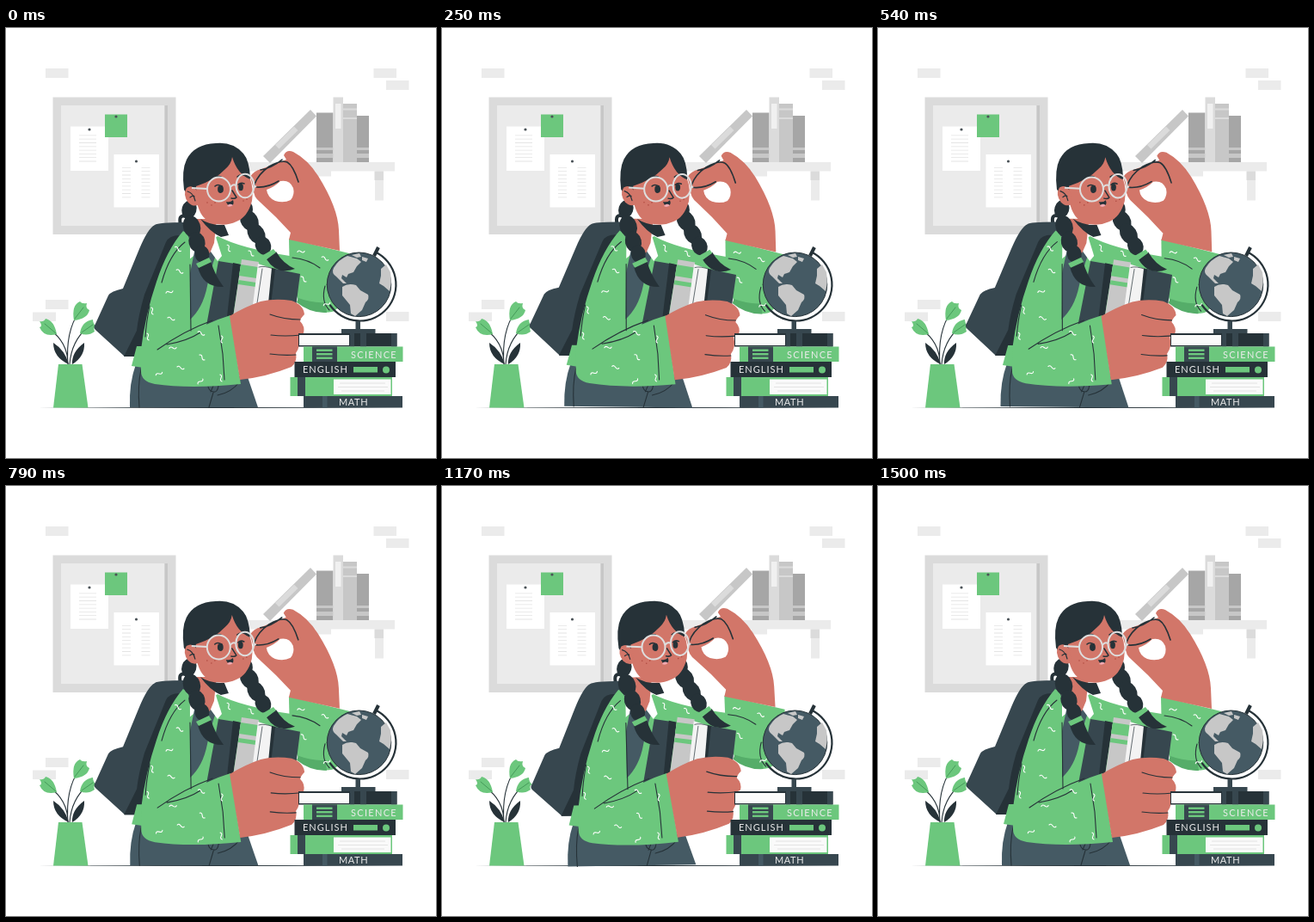
These frames come from a looping animation (500x500 px, 1.54 s). An HTML page:

```html
<!DOCTYPE html>
<html lang="en">
<head>
<meta charset="utf-8">
<title>Student</title>
<style>
  html, body { margin: 0; width: 100%; height: 100%; overflow: hidden; background: #fff; }
  svg { display: block; width: 100%; height: 100%; }
  .green { fill: #6cc77d; }
  .moss { fill: #55ad69; }
  .ink { fill: #263238; }
  .slate { fill: #37474f; }
  .denim { fill: #455a64; }
  .skin { fill: #d27669; }
  .white { fill: #fff; }
  .g1 { fill: #ebebeb; }
  .g2 { fill: #dbdbdb; }
  .g3 { fill: #c7c7c7; }
  .g4 { fill: #a6a6a6; }
  .line { fill: none; stroke: #263238; stroke-width: 1.1; stroke-linecap: round; stroke-linejoin: round; }
  .rule { fill: none; stroke: #e4e4e4; stroke-dasharray: .8 3.5; }
  .glass { fill: none; stroke: #dedede; stroke-width: 2; }
  .mark { fill: none; stroke: #fff; stroke-width: 1.1; stroke-linecap: round; }
  text { font: 400 11px Lato, sans-serif; fill: #ebebeb; }
</style>
</head>
<body>
<svg viewBox="0 0 500 500">
  <!-- wall -->
  <path class="g1" d="M46 47h26.500v11H46zM427.500 47H454v11h-26.500zM442 61h26.500v11H442zM46 316h26.500v11H46zM31 330.500h27v10.500H31zM442 330h26.500v11H442z"/>
  <path class="g2" d="M54.500 80.500H197.500V240H54.500z"/>
  <path class="g1" d="M64 90H184.500V230H64z"/>
  <path class="g3" d="M184.500 90H188V230h-3.500z"/>
  <path class="white" d="M75 114.500h44V166H75zM125.500 147H178v61.500h-52.500z"/>
  <path class="green" d="M115 100.500h26V127h-26z"/>
  <path class="rule" stroke-width="20" d="M95 124.500V159"/>
  <path class="rule" stroke-width="10" d="M140 162v38M162.500 162v38"/>
  <g fill="#4a5257"><circle cx="97" cy="118" r="1.600"/><circle cx="128" cy="103" r="1.600"/><circle cx="151.500" cy="155" r="1.600"/></g>

  <!-- shelf -->
  <path class="g1" d="M280 156H452v10.500H280zM429 177h10v23.500h-10zM360 166h18v6.500h-18z"/>
  <path class="g2" d="M428.500 166.500h10.500V177h-10.500z"/>
  <path class="g3" d="M299 149L354 95l7 7.500L307 157z"/>
  <path class="g2" d="M313 136l22-21.500 4.500 4.500-22 21.500z"/>
  <path class="g4" d="M361 98.500h19.500V156H361zM408 102h14v54h-14z"/>
  <path class="g3" d="M361 139h19.500v3H361zM361 146h19.500v5H361zM408 139h14v3h-14zM408 146h14v5h-14zM392 88h16v68h-16z"/>
  <path class="g2" d="M380.500 80.500H392V156h-11.500zM392 93.500h16v2h-16zM392 104h16v2h-16z"/>
  <path fill="#f0f0f0" d="M383 88h6.500v29H383z"/>

  <!-- floor and plant -->
  <path class="ink" d="M37 441.500Q250 440.500 462 441.500Q250 442.500 37 441.500z"/>
  <path class="line" d="M72 391Q72 365 50 350M72 391Q69 353 85 330M74 391Q76 364 95 348"/>
  <path class="ink" d="M73 391Q55 383 55 366Q69 375 73 391zM77 391Q76 377 91 366Q92 382 77 391z"/>
  <path class="green" d="M59 356Q44 360 39 348Q43 347 39 341Q44 342 46 338Q56 340 59 356zM79 340Q76 322 86 318Q88 321 94 320Q92 326 97 328Q95 338 79 340zM86 355Q88 341 101 339Q101 344 105 347Q101 348 103 353Q95 359 86 355z"/>
  <path class="line" style="stroke:#459b5a;stroke-width:1" d="M58 355L45 344M80 338L90 325M88 354L101 345"/>
  <path class="green" d="M61 391H88.500L95.500 441.500H55z"/>

  <g id="girl">
    <!-- backpack -->
    <path class="line" style="stroke-width:4" d="M203 229Q200 216 209 219L216 228"/>
    <path class="slate" d="M173 229Q177 226 208 226L214 245 155 382H138L104 351Q101 348 104 344L119 311Q122 306 136 303L155 257Q165 233 173 229z"/>
    <path class="ink" d="M205 241Q190 240 186 249L161 310Q154 334 152 352L137 382H155L178 310 210 240z"/>

    <!-- jeans -->
    <path class="denim" d="M151 391Q143 413 144 441H293L281 406z"/>
    <path class="line" d="M157 397Q153 415 155 441M272 411Q262 424 246 427M241 416L238 423M247 416Q246 424 241 423Q236 422 235 417M241 424L236 441"/>

    <!-- cardigan and shirt -->
    <path class="green" d="M152 370L146 393 160 395 172 370zM246 242Q272 256 330 265L340 300 300 340 212 360V270z"/>
    <path class="denim" d="M222 246L213 290V340Q229 326 234 300Q238 280 244 264L232 246z"/>
    <path class="white" d="M236 249L244 243 251 265 246 271 238 260z"/>
    <path class="skin" d="M222 222H245L242 250 237 262Q225 256 218 240z"/>
    <path class="ink" d="M226 222Q238 230 254 229L259 241 250 243Q238 238 226 222z"/>

    <!-- raised arm -->
    <path class="green" d="M329 245L399 262Q397 325 379 330Q360 334 340 317L330 290z"/>
    <path class="moss" d="M340 314Q356 320 371 319L373 331Q354 332 338 319z"/>
    <path class="line" d="M333 267Q352 269 365 279M371 300Q366 318 376 328"/>
    <path class="skin" fill-rule="evenodd" d="M323 148Q326 141 334 144Q351 153 363 172Q386 209 387 235L388 259 329 246 331 238Q314 219 296 203Q287 196 288 187L284 173Q288 166 297 164L326 153zM303 188Q312 185 319 178Q330 176 334 186Q336 194 331 200Q323 204 313 201Q304 197 303 188z"/>
    <path class="line" style="stroke-width:1.600" d="M289 182Q293 170 306 161Q320 153 327 156Q334 160 340 179M291 185Q304 186 317 178M296 165Q309 163 321 153"/>

    <!-- carried books -->
    <path class="slate" d="M247 271L272 275 263 336 233 346z"/>
    <path class="ink" d="M264 273L273 275 264 336 257 336z"/>
    <path class="g3" d="M274 269L294 272 287 330 264 337z"/>
    <path class="green" d="M273 275L293 278 291.500 291 271 288zM270.500 293L291 296 290.500 301 270 298z"/>
    <path fill="#f3f3f3" d="M293 274L311 280 307 325 286 330z"/>
    <path class="line" style="stroke-width:.7" d="M298 280L292 320M294 278Q300 276 311 280"/>
    <path class="ink" d="M309 279L314 280 309 320 305 320z"/>
    <path class="slate" d="M313 280L342 286 337 325 308 322z"/>

    <!-- front sleeve and hand -->
    <path class="green" d="M206 236Q214 240 214 252L214 356Q232 343 261 334L273 414Q214 420 173 414Q157 411 157 399L157 374Q162 333 175 295Q187 258 206 236z"/>
    <path class="line" d="M208 249Q190 263 181 296M167 323Q163 343 162 359M176 374Q207 352 240 340M214 275L215 352M247 346L252 379 254 409M187 368Q211 364 226 354"/>
    <path class="skin" d="M260 335Q278 324 296 318Q313 314 332 317Q346 322 347 333Q342 338 342 341Q348 347 346 355L340 358Q343 370 337 378Q339 388 332 394Q302 406 272 409z"/>
    <path class="line" d="M307 333Q323 339 342 339M308 357Q324 359 343 357M307 379Q322 381 337 380"/>
    <g id="marks" class="mark"></g>

    <!-- braids -->
    <g class="ink">
      <ellipse cx="213" cy="211" rx="8.500" ry="11" transform="rotate(18 213 211)"/>
      <ellipse cx="216" cy="231" rx="10" ry="13" transform="rotate(-18 216 231)"/>
      <ellipse cx="222" cy="249" rx="9.500" ry="12" transform="rotate(-14 222 249)"/>
      <ellipse cx="228" cy="263" rx="8.500" ry="10" transform="rotate(-8 228 263)"/>
      <path d="M223 278L238 271Q243 288 253 301Q229 302 223 278z"/>
      <ellipse cx="279" cy="211" rx="8" ry="11"/>
      <ellipse cx="283" cy="224" rx="10" ry="13" transform="rotate(-32 283 224)"/>
      <ellipse cx="291" cy="239" rx="9.500" ry="13" transform="rotate(-32 291 239)"/>
      <ellipse cx="299" cy="253" rx="9" ry="11" transform="rotate(-25 299 253)"/>
      <path d="M303 269L314 260Q322 274 336 280Q315 288 303 269z"/>
    </g>
    <path class="green" d="M221 274L236 267 239 272 224 279zM299 264L311 257 314 261 303 269z"/>

    <!-- head -->
    <path class="ink" d="M207 188Q204 165 210 153Q219 135 244 134Q264 132 276 146Q283 154 284 174L278 200 216 202z"/>
    <path class="skin" d="M263 150Q262 158 255 164Q243 177 221 184L222 203Q226 221 238 226Q253 232 268 225Q281 220 286 201Q288 186 284 176Q269 170 263 150z"/>
    <path class="skin" d="M223 191Q217 181 210 186Q205 194 212 203Q218 209 225 205z"/>
    <path class="line" style="stroke-width:1.200" d="M211 190Q218 192 220 201M214 197Q218 194 219 196"/>
    <g fill="#b04b41"><circle cx="234" cy="203" r=".8"/><circle cx="239" cy="206" r=".8"/><circle cx="243" cy="203" r=".8"/><circle cx="276" cy="201" r=".8"/><circle cx="280" cy="199" r=".8"/></g>
    <ellipse class="ink" cx="249.500" cy="187.500" rx="3.400" ry="4.400"/>
    <ellipse class="ink" cx="273" cy="185" rx="2.900" ry="4.200"/>
    <path class="line" style="stroke-width:1.600" d="M243 184Q246 181 251 184M270 182Q273 179 277 181M238 176Q243 171 250 173M269 173Q272 170 277 171"/>
    <path class="line" style="stroke-width:1.500" d="M263 189L268 197Q266 199 262 198"/>
    <path class="ink" d="M256 202Q261 203 264 200Q266 205 262 207Q258 208 256 202z"/>
    <path fill="#f2a8b0" d="M257 207Q260 203 264 206Q261 209 257 207z"/>
    <path class="glass" d="M216 186L234 187M261 185Q264 181 267 183M288 185L291 184"/>
    <ellipse class="glass" cx="247.500" cy="187.500" rx="13.500" ry="14"/>
    <ellipse class="glass" cx="278" cy="183.500" rx="10.500" ry="13.800"/>
  </g>

  <!-- globe -->
  <path class="line" style="stroke-width:2.200" d="M430 260.800A42 42 0 1 1 377 322.500"/>
  <path class="line" style="stroke-width:4;stroke-linecap:butt" d="M428 265L433 255"/>
  <circle class="denim" cx="410.500" cy="298.300" r="37.300"/>
  <path class="line" style="stroke-width:1" d="M373.200 298.300A37.300 37.300 0 1 1 410.500 335.600A37.300 37.300 0 0 1 373.200 298.300"/>
  <path class="g3" d="M381 279Q387 269 397 265L408 268 413 272 408 277 404 284 398 286 396 290 391 287 390 291 396 297 392 297 384 289Q378 285 381 279zM391 301Q398 296 407 299L412 305 421 310Q423 315 418 319L414 328 406 335 401 332 400 322 391 311zM436 280L442 275 447 284Q449 296 446 306L439 300 434 297 436 288zM402 264L411 262 413 266 408 267zM414 266L421 268 419 272 414 270z"/>
  <path class="slate" d="M406.500 341h5.500v9h-5.500zM390 350h39.500v5H390z"/>

  <!-- book stack -->
  <path class="ink" d="M340 355H454.500V370.500H340z"/>
  <path fill="#fafafa" d="M341 357H399V369H341z"/>
  <path class="slate" d="M400 355h5v15.500h-5zM412 355h7v15.500h-7zM448 355h6.500v15.500h-6.500z"/>
  <path class="green" d="M346 370.500H461.500V388H346z"/>
  <path class="slate" d="M356 370.500h29V388h-29z"/>
  <path class="green" d="M361 373.500h18.500v2.500H361zM361 378h18.500v2.500H361zM361 382.500h18.500v2.500H361z"/>
  <path class="ink" d="M335.500 388H453v18H335.500z"/>
  <path class="green" d="M404 394h28v6.500h-28zM330.500 406H449v22H330.500z"/>
  <circle class="green" cx="442" cy="397.500" r="4"/>
  <path class="slate" d="M339 406h9v22h-9zM346 428H461V441.500H346z"/>
  <path fill="#fafafa" d="M381 408.500H447.500V426H381z"/>
  <path stroke="#dedede" stroke-width=".8" d="M388 413H441M386 417.500H444M390 422H440"/>
  <path class="denim" d="M368 428h5.500v13.500H368z"/>
  <text x="401" y="383.500" letter-spacing="1.300">SCIENCE</text>
  <text x="345" y="401.300" letter-spacing="1">ENGLISH</text>
  <text x="387" y="438.500" letter-spacing=".6">MATH</text>
</svg>
<script>
  const girl = document.getElementById('girl');

  // x, y, turn of each squiggle on the knitwear
  const squiggles = [
    [200, 257, 20], [202, 283, 10], [190, 307, -30], [192, 338, 0], [170, 329, 60],
    [227, 355, 10], [165, 359, 60], [194, 372, -20], [228, 383, 30], [203, 395, 0],
    [178, 402, -40], [226, 411, -60], [250, 407, 60], [251, 362, 70], [259, 256, 50],
    [285, 262, 30], [343, 260, -20], [371, 268, 10], [346, 292, 30], [373, 321, -40]
  ];
  document.getElementById('marks').innerHTML = squiggles.map(([x, y, turn]) =>
    `<path transform="translate(${x} ${y}) rotate(${turn})" d="M-4 -1Q-2 -3 0 0T4 1"/>`).join('');

  const LOOP = 1540, QUARTER = 375;

  // Linear sway: 0 → 1 → -1 → 0 degrees, then a short rest
  function sway(time) {
    const q = Math.min(time / QUARTER, 4);
    return q < 1 ? q : q < 3 ? 2 - q : q - 4;
  }

  function draw() {
    girl.setAttribute('transform', `rotate(${sway(performance.now() % LOOP)} 250 287)`);
    requestAnimationFrame(draw);
  }
  draw();
</script>
</body>
</html>
```
